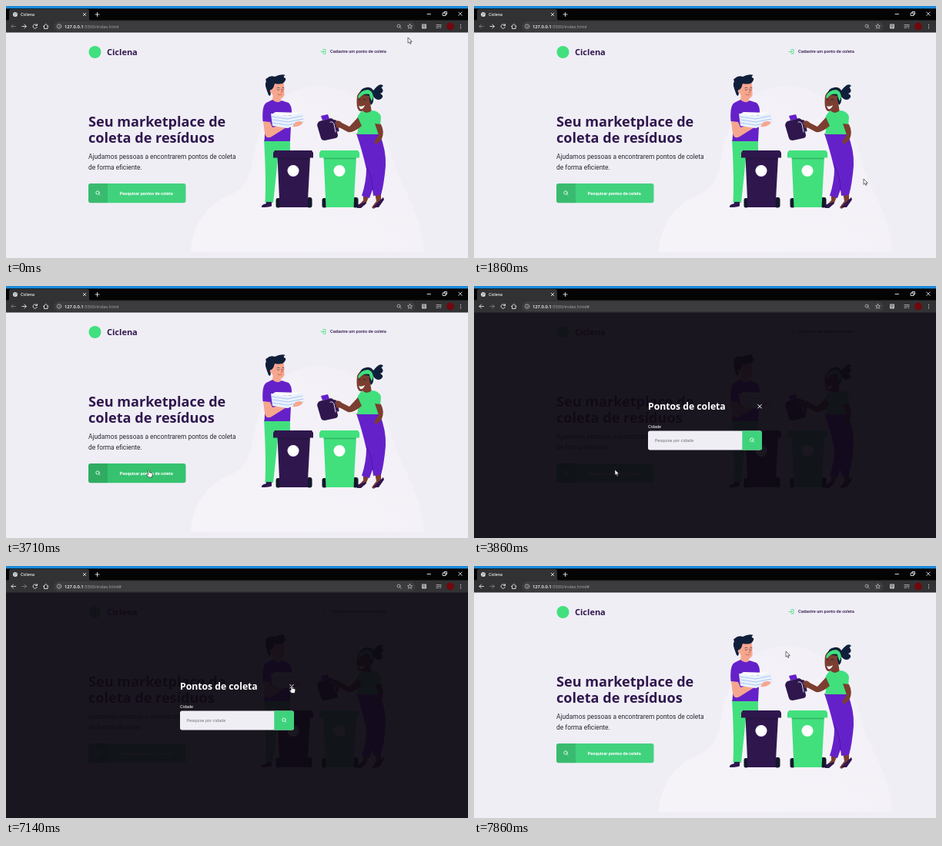
An HTML page that plays this animation: 600x328 px, repeating every 8 s.

```html
<!DOCTYPE html>
<html lang="pt-BR">
<head>
<meta charset="utf-8">
<title>Ciclena</title>
<style>
  html, body { margin: 0; width: 100%; height: 100%; overflow: hidden; background: #f0eef5; }
  svg { display: block; width: 100vw; height: 100vh; }
  text { font-family: Roboto, sans-serif; white-space: pre; }
  .ui { font-family: "Open Sans", sans-serif; }
  .head { font-family: "Open Sans", "Noto Sans", sans-serif; font-weight: 700; }
  .line { fill: none; stroke-linecap: round; stroke-linejoin: round; }
  .green { fill: #41e07d; }
  .purple { fill: #6521c9; }
  .dark { fill: #2f174e; }
  .navy { fill: #0f1f3a; }
  .skin { fill: #f6a68e; }
  .brown { fill: #7b3e30; }
  .off { opacity: .4; }
  #button { fill: #41d27d; }
  #button.hover { fill: #36c26f; }
</style>
</head>
<body>
<svg viewBox="0 0 600 328" preserveAspectRatio="none">
  <defs>
    <linearGradient id="glow" x1="0" y1="1" x2="1" y2="0">
      <stop offset="0" stop-color="#f6f4f9"/>
      <stop offset="1" stop-color="#f2f0f6"/>
    </linearGradient>
    <g id="search" class="line" stroke="#fff" stroke-width=".8">
      <circle r="2.2"/><path d="M1.7 1.7L3 3"/>
    </g>
    <g id="bin">
      <path d="M5.500 8H48L44.500 74H8.500Z"/>
      <path d="M2 0H50L52 3V9.500H0V3Z"/>
      <path d="M5.500 10.500H47.500" stroke="#000" stroke-opacity=".2" stroke-width="1.500"/>
      <circle cx="26" cy="26.500" r="7.500" fill="#fff"/>
    </g>
    <g id="wheels" fill="#15182a">
      <rect x="3.500" y="62" width="6" height="12.500" rx="2.500"/>
      <rect x="43.500" y="61" width="7" height="13.500" rx="3"/>
    </g>
  </defs>

  <g id="page">
    <rect width="600" height="328" fill="#f0eef5"/>
    <path fill="url(#glow)" d="M240 320C242 283 263 257 291 246C316 235 318 216 323 188C331 146 358 104 405 104C453 104 487 143 500 192C510 235 541 268 543 320Z"/>

    <circle class="green" cx="115.500" cy="60" r="8"/>
    <text class="head" x="131" y="64" font-size="11" fill="#2f174e">Ciclena</text>
    <path class="line" stroke="#41e07d" stroke-width=".8" d="M412 56.500H415V62.200H412M409 59.400H413M411.500 57.700L413.200 59.400L411.500 61.100"/>
    <text x="421" y="61.300" font-size="5.650" font-weight="500" fill="#2f174e">Cadastre um ponto de coleta</text>

    <g font-size="18.100" fill="#2f174e">
      <text class="head" x="107" y="156.500">Seu marketplace de</text>
      <text class="head" x="107" y="178.300">coleta de resíduos</text>
    </g>
    <g font-size="8.400" fill="#2b2633">
      <text x="107" y="199.300">Ajudamos pessoas a encontrarem pontos de coleta</text>
      <text x="107" y="213">de forma eficiente.</text>
    </g>
    <rect id="button" x="107" y="231" width="126.500" height="25.300" rx="2.700"/>
    <path fill="#000" fill-opacity=".11" d="M132 231V256.300H109.700Q107 256.300 107 253.600V233.700Q107 231 109.700 231Z"/>
    <use href="#search" x="119" y="243"/>
    <text x="182.300" y="245.600" text-anchor="middle" font-size="5.650" font-weight="700" fill="#fff">Pesquisar pontos de coleta</text>

    <g id="man">
      <path class="green" d="M335 174H369V190H354L347 256H336.500Q338 222 335 174Z"/>
      <path class="dark" d="M338 255H345V260.500Q340 262 332 262Q331 258.500 338 257Z"/>
      <path class="skin" d="M347 113H357V125Q352 130 346 124Z"/>
      <path class="skin" d="M343 101Q352 95 361 101L361.500 116Q358 123 351 121Q344 117 343 101Z"/>
      <path class="navy" d="M341 116C339 109 335 103 338 98Q336 95 339 94Q343 90 349 92Q357 88 363 90Q360 91 361 93Q365 94 362 98Q360 103 349 101Q348 106 345 109Q344 114 343 117Z"/>
      <circle class="skin" cx="345" cy="111" r="2.300"/>
      <path class="line" stroke="#16203b" stroke-width=".6" d="M352 106.500q1.500-1 3 0M358.500 106.500q1.300-1 2.500 0M352 109q1.500 1 3 0M358.500 109q1 1 2 0"/>
      <path class="line" stroke="#b6533f" stroke-width=".7" d="M357.500 108L359 112L357 112.500M353 115q3 2 5 0"/>
      <path class="purple" d="M346 122Q352 128 358 123L367 126Q371 130 371 137L369 176H335.500L337 151L333.500 150Q332 130 338 126Z"/>
      <path class="skin" d="M334 150L343 151L346 158L359 155L364 158L345 170Q338 174 336 166Z"/>
      <path d="M344 140L366 143L385 139L386 151L366 159L346 156Z" fill="#e9f2ff"/>
      <path d="M345 144L366 147L385 143M346 148L366 151L386 147M346 152L366 155L386 151" class="line" stroke="#9db9e8" stroke-width=".8"/>
      <path d="M345 141L350 138L382 139L366 143Z" fill="#fff"/>
      <path class="skin" d="M376 151Q385 148 385 153Q380 158 372 157Z"/>
    </g>

    <g id="woman">
      <path class="brown" d="M464 244L472 246L468 256L461 262L457 260L464 253ZM479 243L487 243L487 253L483 261L477 264L475 262L481 254Z"/>
      <path class="dark" d="M456 259L467 255L468 257L461 263H456ZM477 261L490 249L491 252L484 262H477Z"/>
      <path class="purple" d="M455 166H485Q494 188 493 208Q491 232 487 246L477 247L476 239L472 250L462 247Q468 228 468 212Q462 186 455 166Z"/>
      <path class="line" stroke="#4813a0" stroke-width=".8" d="M476 239Q476 222 468 208"/>
      <path class="brown" d="M463 128L473 126L475 139Q468 144 462 138Z"/>
      <path class="brown" d="M456 117Q460 107 472 111L474 126Q471 138 460 137Q454 135 456 117Z"/>
      <path class="navy" d="M459 115Q460 107 468 106Q474 105 477 110Q481 105 484 103Q488 101 490 104Q486 106 489 108Q491 112 486 114Q492 117 487 121Q482 124 477 118Q478 126 474 129Q471 122 472 117Z"/>
      <path class="green" d="M457 119Q460 109 470 109Q476 110 477 118L475 124Q472 118 472 115Q464 113 459 120Z"/>
      <path class="line" stroke="#16203b" stroke-width=".7" d="M458 122q1.500-1.300 2.500 0M464 122q2-1.300 3.500 0"/>
      <path d="M458 130Q462 132 466 129Q464 135 460 134Z" fill="#fff"/>
      <path class="green" d="M463 136Q468 142 475 136Q484 136 487 144L486 158L484 167H456Q459 155 455 150Q457 140 463 136Z"/>
      <path class="brown" d="M457 145L462 156Q450 166 444 164L431 157L428 151L434 151L446 157Z"/>
      <path class="brown" d="M479 153L487 154Q492 164 488 173L481 180L478 177L484 168Z"/>
    </g>

    <g id="jug">
      <path class="line" stroke="#2f174e" stroke-width="3" d="M421 149L428 150L431 162"/>
      <path class="dark" d="M407 150L422 146Q426 147 427 151L431 168Q431 171 428 172L414 175Q410 175 409 172L404 155Q404 152 407 150Z"/>
      <path class="purple" d="M409 143L418 141L420 147L411 149Z"/>
      <path class="line" stroke="#f0eef5" stroke-width=".9" d="M421 151Q425 150 426 154L428 164"/>
      <path class="brown" d="M427 151Q432 147 436 152L435 158L430 159Z"/>
    </g>

    <use href="#wheels" x="347" y="188"/>
    <use href="#bin" class="dark" x="347" y="188"/>
    <use href="#wheels" x="407" y="188"/>
    <use href="#bin" class="green" x="407" y="188"/>
  </g>

  <g id="modal">
    <rect y="34" width="600" height="294" fill="#0e0a14" fill-opacity=".945"/>
    <text class="head" x="226" y="160.700" font-size="12.200" fill="#fff">Pontos de coleta</text>
    <path class="line" stroke="#fff" stroke-width="1" d="M368.700 154.400L373.300 159M373.300 154.400L368.700 159"/>
    <text x="226" y="184.800" font-size="5.500" fill="#fff">Cidade</text>
    <rect x="226" y="188.500" width="148" height="25" rx="2.700" fill="#f0eef5"/>
    <path fill="#3fd27c" d="M348.300 188.500H371.300Q374 188.500 374 191.200V210.800Q374 213.500 371.300 213.500H348.300Z"/>
    <use href="#search" x="360.800" y="200.200"/>
    <text x="234.700" y="203" font-size="5.600" fill="#77757c">Pesquise por cidade</text>
  </g>

  <g id="browser">
    <rect width="600" height="34.500" fill="#323234"/>
    <rect width="600" height="18.500" fill="#040404"/>
    <path fill="#323234" d="M2 19Q4 19 4 16V7Q4 4 7 4H105Q108 4 108 7V16Q108 19 110 19Z"/>
    <rect width="600" height="3.300" fill="#1c8adb"/>
    <circle cx="12" cy="11" r="3" fill="#e6e7e9"/>
    <path class="line" stroke="#55575b" stroke-width=".7" d="M10 9L12 11L11 13M13 8.500L13 10L14.500 11.500"/>
    <text class="ui" x="19" y="13" font-size="5.200" font-weight="600" fill="#f4f4f4">Ciclena</text>
    <rect x="62" y="20" width="469.500" height="13" rx="6.500" fill="#3c3c3e"/>
    <g class="line" stroke="#e6e7e9" stroke-width=".9">
      <path d="M100.200 9.200L103.800 12.800M103.800 9.200L100.200 12.800M116 11H121M118.500 8.500V13.500"/>
      <path d="M547 10.500H551.500M587.800 8L592.200 12.400M592.200 8L587.800 12.400M567.500 9H571V12.500H567.500ZM569 9V7.500H572.500V11H571"/>
      <path id="back" d="M12.500 26.500H7M9.400 24L7 26.500L9.400 29"/>
      <path id="forward" d="M20.800 26.500H26.300M23.900 24L26.300 26.500L23.900 29"/>
      <path d="M40 25A2.700 2.700 0 1 0 40.300 27.500M40.500 23.500V25.500H38.500M48.500 26.500L51.800 23.500L55 26.500M49.500 26V29.500H54V26"/>
      <g stroke="#c8c9cb" stroke-width=".7">
        <circle cx="69" cy="26.500" r="2.800"/><path d="M69 26.300V28M69 24.900V25"/>
        <circle cx="510" cy="26" r="2"/><path d="M511.500 27.500L513.300 29.300"/>
        <path d="M524.500 23.500L525.400 25.500L527.500 25.700L525.900 27.100L526.400 29.200L524.500 28.100L522.600 29.200L523.100 27.100L521.500 25.700L523.600 25.500Z"/>
        <path d="M559 24.500H565M559 26.500H563M559 28.500H561.500M564 29V26.500L565.500 26"/>
      </g>
    </g>
    <rect x="540" y="23.500" width="6" height="6" rx=".8" fill="#c0c1c3"/>
    <path class="line" stroke="#47494d" stroke-width=".8" d="M541.800 25H544.200V27L543 28.300L541.800 27Z"/>
    <circle cx="577" cy="26.500" r="5" fill="#6e0a0f"/>
    <path class="line" stroke="#e6e7e9" stroke-width="1.200" d="M590.500 24.300V24.310M590.500 26.500V26.510M590.500 28.700V28.710"/>
    <text class="ui" x="76" y="28.800" font-size="5.800" fill="#a8aaad"><tspan fill="#fff" font-weight="600">127.0.0.1</tspan>:5500/index.html<tspan id="hash">#</tspan></text>
  </g>

  <g id="cursor" fill="#fff" stroke="#111" stroke-width=".6" stroke-linejoin="round">
    <path id="arrow" d="M0 0V7.300L1.700 5.800L2.900 8.400L4.100 7.900L3 5.400H5.300Z"/>
    <path id="hand" d="M-.9 .6Q0-.6 .8 .6V3.300L4 4Q5 4.300 4.800 5.500L4 9.500H-.2L-2.900 6.200Q-2.500 4.900-.9 6Z"/>
  </g>
</svg>
<script>
  const LOOP = 8000, RATE = 7;          // the screen refreshes seven times a second
  const OPEN = 27, CLOSE = 53;          // steps during which the dialog shows
  // pointer stops: step, x, y
  const stops = [
    [0, 522, 41], [4, 506, 108], [8, 504, 165], [10, 511, 189], [11, 511, 189],
    [13, 506, 225], [16, 395, 280], [19, 212, 248], [22, 190, 243], [26, 185.5, 239.5],
    [27, 183, 239], [32, 183, 239], [36, 280, 205], [40, 372.5, 160], [41, 375.5, 158],
    [44, 357, 212], [47, 368, 172], [48, 371.5, 162], [49, 371, 156], [53, 371, 156],
    [55, 405, 111]
  ];
  const $ = id => document.getElementById(id);
  const show = (id, on) => $(id).style.display = on ? "" : "none";
  const within = (p, x, y, w, h) => p.x >= x && p.x <= x + w && p.y >= y && p.y <= y + h;

  function pointer(step) {
    const next = stops.findIndex(s => s[0] >= step);
    if (next < 1) {
      const [, x, y] = next ? stops[stops.length - 1] : stops[0];
      return { x, y };
    }
    const [s0, x0, y0] = stops[next - 1], [s1, x1, y1] = stops[next];
    const k = (step - s0) / (s1 - s0);
    return { x: x0 + (x1 - x0) * k, y: y0 + (y1 - y0) * k };
  }

  function draw() {
    const time = performance.now() % LOOP;
    const step = Math.floor((time + 5) * RATE / 1000);
    const visited = step >= OPEN;
    const open = visited && step < CLOSE;
    const p = pointer(step);
    const overButton = !open && within(p, 107, 231, 126, 25);
    const overDialog = open && (within(p, 348, 188, 26, 25) || within(p, 367.5, 153, 7, 6.5));
    show("modal", open);
    show("hash", visited);
    show("hand", overButton || overDialog);
    show("arrow", !overButton && !overDialog);
    $("back").classList.toggle("off", !visited);
    $("forward").classList.toggle("off", visited);
    $("button").classList.toggle("hover", overButton);
    $("cursor").setAttribute("transform", `translate(${p.x} ${p.y})`);
    requestAnimationFrame(draw);
  }
  draw();
</script>
</body>
</html>
```
